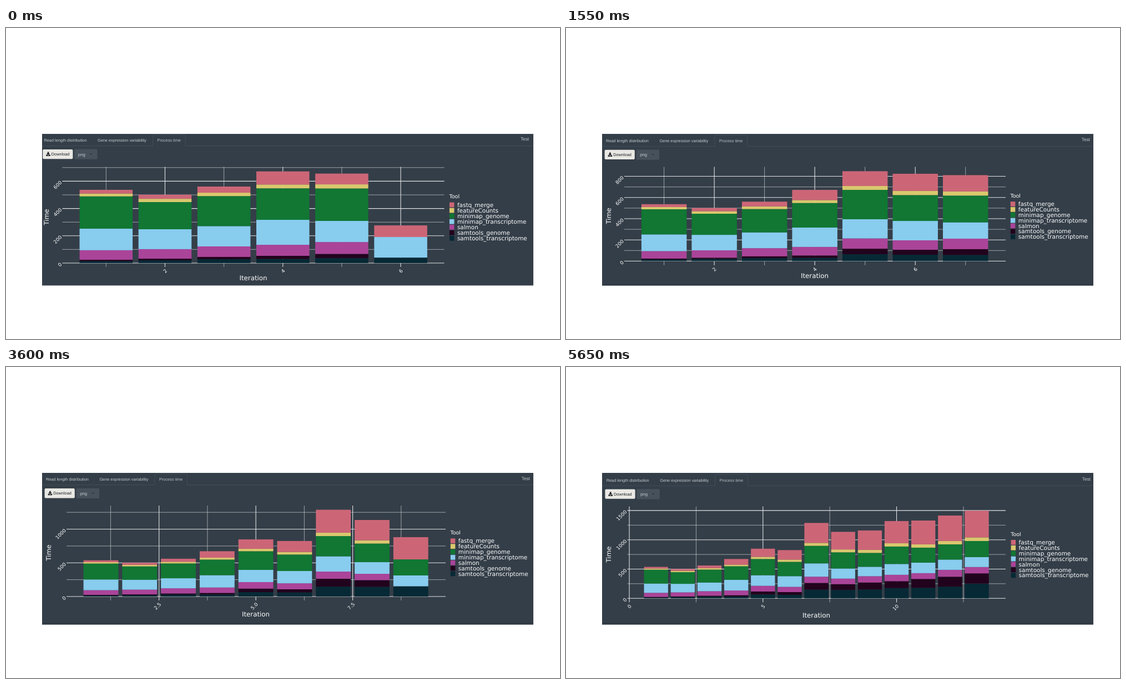
Write an HTML page that moves like this. It is 998 px wide and 561 px high and loops after 7.16 s.

```html
<!DOCTYPE html>
<html lang="en">
<head>
<meta charset="utf-8">
<title>Process time</title>
<style>
html, body { margin: 0; width: 100%; height: 100%; overflow: hidden; background: #fff; }
svg { display: block; width: 998px; height: 561px; text-rendering: geometricPrecision; }
.ui { font-family: "Liberation Sans", Arial, sans-serif; font-size: 7.33px; fill: #c6cbd0; }
.plot { font-family: "DejaVu Sans", Verdana, sans-serif; fill: #fff; }
</style>
</head>
<body>
<svg id="stage" viewBox="0 0 998 561">
  <clipPath id="panel"><rect x="65" y="191" width="885" height="273.5"/></clipPath>
  <rect x="65" y="191" width="885" height="273.5" fill="#343e48"/>
</svg>
<script>
const NS = 'http://www.w3.org/2000/svg';
const stage = document.getElementById('stage');

// Stacked from the bottom up
const tools = [
  ['samtools_transcriptome', '#062935'],
  ['samtools_genome', '#22031d'],
  ['salmon', '#aa4499'],
  ['minimap_transcriptome', '#88ccee'],
  ['minimap_genome', '#117733'],
  ['featureCounts', '#d9c86e'],
  ['fastq_merge', '#cc6677']
];

// Cumulative time per iteration
const totals = [
  [14, 24, 94, 252, 489, 510, 537],
  [20, 32, 102, 248, 447, 471, 501],
  [28, 45, 122, 271, 491, 516, 561],
  [30, 53, 134, 317, 548, 576, 672],
  [65, 117, 214, 395, 672, 709, 848],
  [60, 107, 196, 379, 623, 662, 824],
  [148, 263, 370, 597, 897, 947, 1288],
  [144, 243, 337, 510, 786, 835, 1136],
  [151, 270, 378, 539, 776, 828, 1159],
  [175, 293, 402, 587, 885, 941, 1320],
  [180, 331, 430, 610, 866, 922, 1329],
  [199, 369, 487, 662, 922, 979, 1414],
  [251, 426, 535, 705, 979, 1041, 1497]
];

// x1: centre of bar 1, dx: bar step, y0: zero line, k: px per unit;
// late: bars still running, shown after the first n finished ones
const views = [
  { at: 0, ui: [0, 0], x1: 180.3, dx: 106.15, y0: 424, k: .246, left: 101.5, right: 789.5, top: 250.5, bottom: 431,
    yStep: 200, xMajor: [2, 4, 6], xMinor: [1, 3, 5], digits: 0, done: 4,
    late: [[37, 67, 154, 309, 547, 577, 656], [40, 40, 40, 191, 191, 191, 276]],
    xTitle: [445.5, 455], yTitle: [77.2, 341], legend: [798.6, 306.8, 319, 10.07], test: [927, 203.4] },
  { at: 1550, ui: [3.4, .9], x1: 176.6, dx: 90.52, y0: 420.5, k: .1912, left: 105, right: 792, top: 250.5, bottom: 428,
    yStep: 200, xMajor: [2, 4, 6], xMinor: [1, 3, 5, 7], digits: 0, done: 6,
    late: [[58, 113, 212, 366, 618, 657, 811]],
    xTitle: [448, 451], yTitle: [80.6, 339], legend: [800.5, 305.7, 317.5, 9.87], test: [928.8, 204.3] },
  { at: 3600, ui: [3.4, .2], x1: 171, dx: 69.78, y0: 414, k: .1215, left: 109, right: 792, top: 250, bottom: 421,
    yStep: 500, xMajor: [2.5, 5, 7.5], xMinor: [1.25, 3.75, 6.25, 8.75], digits: 1, done: 8,
    late: [[152, 152, 152, 313, 551, 551, 881]],
    xTitle: [450, 450], yTitle: [80.6, 335], legend: [800.5, 302.3, 313.7, 9.87], test: [928.8, 203.6] },
  { at: 5650, ui: [4.2, 1.6], x1: 162.2, dx: 48.15, y0: 417.3, k: .1056, left: 110.5, right: 792, top: 251.5, bottom: 424.5,
    yStep: 500, xMajor: [0, 5, 10], xMinor: [2.5, 7.5, 12.5], digits: 0, done: 13, late: [],
    xTitle: [451, 451.7], yTitle: [81.4, 338], legend: [801.3, 304.8, 316.3, 9.92], test: [929.8, 205] }
];
const LOOP = 7160;

function add(parent, tag, attrs, text) {
  const el = document.createElementNS(NS, tag);
  for (const name in attrs) el.setAttribute(name, attrs[name]);
  if (text !== undefined) el.textContent = text;
  parent.append(el);
  return el;
}
const rect = (p, x, y, width, height, fill, rx = 0) => add(p, 'rect', { x, y, width, height, fill, rx });
const line = (p, x1, y1, x2, y2, major) =>
  add(p, 'line', { x1, y1, x2, y2, stroke: '#e2e4e6', 'stroke-width': major ? 1.1 : .6 });
const label = (p, x, y, text, size, more) => add(p, 'text', { x, y, 'font-size': size, ...more }, text);
const tick = (p, x, y, text) =>
  label(p, 0, 0, text, 8.8, { transform: `translate(${x} ${y}) rotate(-45)`, 'text-anchor': 'end' });

function drawControls(view, [dx, dy]) {
  const clip = add(view, 'g', { 'clip-path': 'url(#panel)' });
  const g = add(clip, 'g', { class: 'ui', transform: `translate(${dx} ${dy})` });
  add(g, 'path', { d: 'M60 212.5H264.5V194.2q0-2 2-2H321q2 0 2 2V212.5H960',
    fill: 'none', stroke: '#48535e', 'stroke-width': .7 });
  add(g, 'text', { x: 68.5, y: 205.2 }, 'Read length distribution');
  add(g, 'text', { x: 165, y: 205.2 }, 'Gene expression variability');
  add(g, 'text', { x: 272.5, y: 205.2, fill: '#b9c0c6' }, 'Process time');

  rect(g, 66.2, 218.9, 54.2, 17.3, '#e9e8e4', 2);
  add(g, 'path', { d: 'M74.8 223.6h2.4v2.7h1.9L76 229.4l-3.1-3.1h1.9zM72.3 228.3h1.5l2.2 2.1 2.2-2.1h1.5v2.8h-7.4z', fill: '#1b1d20' });
  add(g, 'text', { x: 81.8, y: 230.2, fill: '#1b1d20' }, 'Download');
  rect(g, 123.2, 218.6, 41.4, 18.2, '#46515b', 2);
  label(g, 129.8, 230.5, 'png', 7.8);
  add(g, 'path', { d: 'M150.8 226.4h4.2l-2.1 2.2z', fill: '#272e35' });
}

function drawPlot(view, v) {
  const g = add(view, 'g', { class: 'plot' });
  const X = i => v.x1 + (i - 1) * v.dx;
  const Y = t => v.y0 - t * v.k;

  for (let t = 0; Y(t) > v.top; t += v.yStep / 2) {
    const major = t % v.yStep === 0;
    line(g, v.left, Y(t), v.right, Y(t), major);
    if (major) tick(g, v.left - .3, Y(t) + 3, t);
  }
  for (const i of v.xMinor) line(g, X(i), v.top, X(i), v.bottom, false);
  for (const i of v.xMajor) {
    line(g, X(i), v.top, X(i), v.bottom, true);
    tick(g, X(i) + 4.4, v.bottom + 7.6, i.toFixed(v.digits));
  }

  [...totals.slice(0, v.done), ...v.late].forEach((stack, n) => {
    let base = 0;
    stack.forEach((t, j) => {
      if (t > base) rect(g, X(n + 1) - v.dx * .45, Y(t), v.dx * .9, (t - base) * v.k, tools[j][1]);
      base = t;
    });
  });

  label(g, ...v.xTitle, 'Iteration', 11.8, { 'text-anchor': 'middle' });
  label(g, 0, 0, 'Time', 11.9, { transform: `translate(${v.yTitle.join(' ')}) rotate(-90)`, 'text-anchor': 'middle' });

  const [lx, ly, row, gap] = v.legend;
  label(g, lx, ly, 'Tool', 9.5);
  [...tools].reverse().forEach(([name, color], n) => {
    const y = row + n * gap;
    rect(g, lx + .3, y - 4.4, 8.5, 8.8, color);
    label(g, lx + 14.3, y + 3.6, name, 10.45);
  });
}

for (const v of views) {
  v.el = add(stage, 'g', { visibility: 'hidden' });
  drawControls(v.el, v.ui);
  drawPlot(v.el, v);
  label(v.el, ...v.test, 'Test', 8.2, { class: 'ui', style: 'font-size:8.2px' });
  if (v.at) rect(v.el, 65, 461.5, 885, 3, '#2f3842');
}

let shown;
const start = performance.now();
function frame(now) {
  const t = Math.max(0, now - start) % LOOP;
  const next = views.filter(v => v.at <= t).pop();
  if (next !== shown) {
    if (shown) shown.el.setAttribute('visibility', 'hidden');
    next.el.setAttribute('visibility', 'visible');
    shown = next;
  }
  requestAnimationFrame(frame);
}
frame(start);
</script>
</body>
</html>
```
